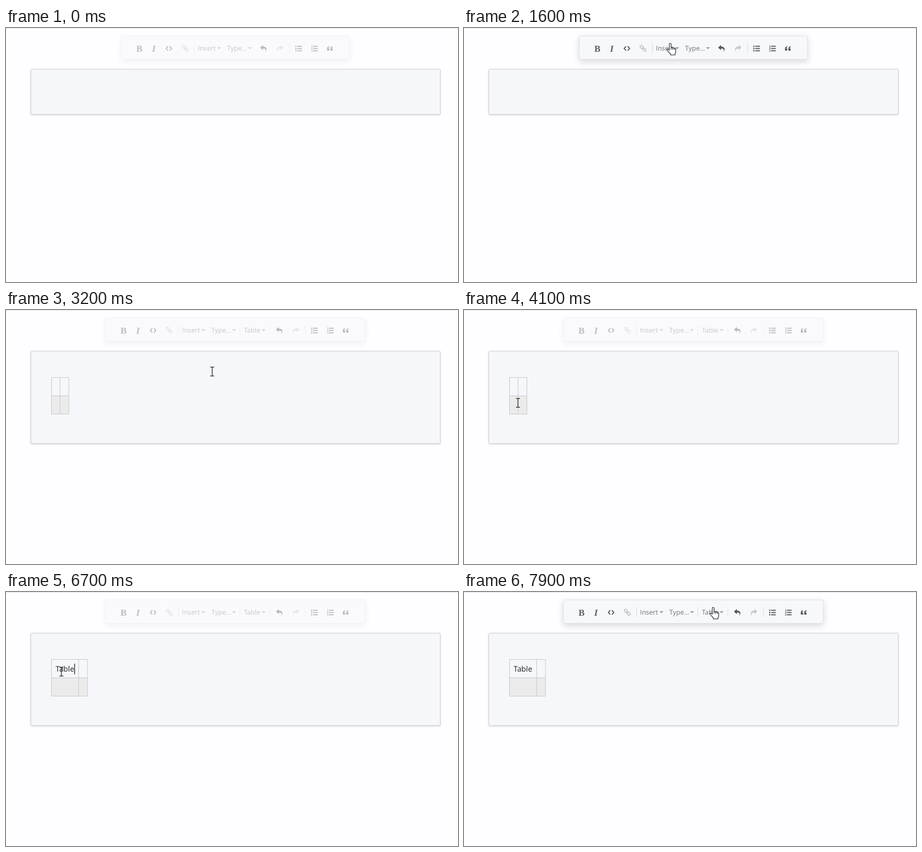
These frames come from a looping animation (800x450 px, 8 s). An HTML page:

```html
<!DOCTYPE html>
<html lang="en">
<head>
<meta charset="utf-8">
<title>Table editor</title>
<style>
  html, body { margin: 0; width: 100%; height: 100%; overflow: hidden; background: #fefdff; }
  svg { display: block; width: 100vw; height: 100vh; }
  text { font: 11.8px "Open Sans", "Noto Sans", sans-serif; fill: #747474; text-rendering: geometricPrecision; }
  .serif { font: bold 16px "Liberation Serif", serif; fill: #5c5c5c; }
  .num { font: bold 5px "Liberation Sans", sans-serif; fill: #555; }
  #word { font-size: 13.4px; fill: #222; }
  #editor { fill: #f5f7fa; stroke: #cfd1d4; filter: drop-shadow(0 1px 1.5px rgba(0,0,0,.16)); }
  #panel { fill: #f6f8fb; stroke: #dfe1e4; filter: drop-shadow(0 4px 6px rgba(0,0,0,.14)); }
  .icon { fill: #555; }
  .tri { fill: #a2a2a2; }
  .sep { stroke: #dcdcdc; }
  .off { opacity: .3; }
  .grid { fill: none; stroke: #cacaca; }
  .pointer { fill: #fff; stroke: #222; stroke-width: 1.1; stroke-linejoin: round; }
</style>
</head>
<body>
<svg viewBox="0 0 800 450">
  <path d="M0 .5H800" stroke="#e5e4e8"/>
  <rect id="editor" x="44" y="73" width="724.5" rx="1.5"/>

  <g id="table">
    <rect id="row" x="80.5" y="152" height="32" fill="#ebebeb"/>
    <path id="lines" class="grid"/>
    <text id="word" x="87.8" y="141.2"></text>
  </g>
  <rect id="caret" width="1.2" height="19" fill="#222"/>

  <g id="bar">
    <rect id="panel" y="14" height="41.5" rx="3"/>
    <g id="left">
      <text class="serif" x="230.8" y="41.6">B</text>
      <text class="serif" x="258.6" y="41.6" font-style="italic" style="font-style:italic">I</text>
      <path class="icon" transform="translate(282.3 29.3) scale(.0134)" d="M608 192l-96 96 224 224-224 224 96 96 288-320-288-320zM288 192l-288 320 288 320 96-96-224-224 224-224-96-96z"/>
      <g class="off" transform="translate(317 36) rotate(45)" fill="none" stroke="#555" stroke-width="1.6">
        <rect x="-6.6" y="-2.2" width="6" height="4.4" rx="2.2"/>
        <rect x=".6" y="-2.2" width="6" height="4.4" rx="2.2"/>
        <path d="M-2.2 0H2.2"/>
      </g>
      <path class="sep" d="M333.5 26.5V44.5"/>
      <text x="339.6" y="39.8">Insert</text>
      <path class="tri" d="M373.8 34h7.2l-3.6 3.7z"/>
      <text x="391.2" y="39.8">Type...</text>
      <path class="tri" d="M428 34h7.2l-3.6 3.7z"/>
    </g>
    <g id="middle">
      <path class="sep" d="M414 26.5V44.5M467 26.5V44.5"/>
      <text x="421" y="39.8">Table</text>
      <path class="tri" d="M452.4 34h7.2l-3.6 3.7z"/>
    </g>
    <g id="right">
      <path class="icon" transform="translate(449 30) scale(.0132 .0122)" d="M761 1024c113-206 132-520-313-509v253l-384-384 384-384v248c534-13 594 472 313 775z"/>
      <path class="icon off" transform="translate(478.4 30) scale(.0132 .0122)" d="M576 248v-248l384 384-384 384v-253c-446-10-427 303-313 509-280-303-221-789 313-775z"/>
      <path class="sep" d="M502 26.5V44.5"/>
      <path class="icon" d="M512 31.2h2.2v2.2h-2.2zM512 35.2h2.2v2.2h-2.2zM512 39.2h2.2v2.2h-2.2z"/>
      <path id="bars" class="icon" d="M515.6 31.4h8.2v1.8h-8.2zM515.6 35.4h8.2v1.8h-8.2zM515.6 39.4h8.2v1.8h-8.2z"/>
      <use href="#bars" x="28"/>
      <text class="num" x="540" y="34.2">1</text>
      <text class="num" x="540" y="38.2">2</text>
      <text class="num" x="540" y="42.2">3</text>
      <path class="icon" transform="translate(568.2 29.6) scale(.0156 .0148)" d="M0 448v256h256v-256h-128c0 0 0-128 128-128v-128c0 0-256 0-256 256zM640 320v-128c0 0-256 0-256 256v256h256v-256h-128c0 0 0-128 128-128z"/>
    </g>
  </g>

  <g id="menu">
    <rect x="340.5" y="44.5" width="98" height="73" fill="#fff" stroke="#b4b4b4"/>
    <rect id="hover" x="343" width="93" height="22.5" fill="#f2f2f2"/>
    <text x="346.4" y="63.6">Image</text>
    <text x="346.4" y="86.2">Horizontal rule</text>
    <text x="346.4" y="108.8">Table</text>
  </g>

  <g id="cursor">
    <path id="arrow" class="pointer" d="M.5.5V16.2L4.2 12.8 6.6 18.4 9 17.4 6.6 12H11.6z"/>
    <path id="beam" d="M-3.5-7.8H-1Q0-7.8 0-6.8Q0-7.8 1-7.8H3.5M0-7V7M-3.5 7.8H-1Q0 7.8 0 6.8Q0 7.8 1 7.8H3.5" fill="none" stroke="#222" stroke-width="1.2"/>
    <g id="hand" class="pointer" transform="translate(-6.6 -.6)">
      <path d="M5 2.4a1.6 1.6 0 0 1 3.2 0V8.8c.3-1.2 2.6-1 2.8.5.4-1.1 2.6-.9 2.8.6.5-.9 2.5-.6 2.5 1.2V16c0 1.5-1.2 2.5-1.2 4v1.4H7.2V20C6 18 3 15.5 1.2 12.8c-.8-1.4.8-2.6 2.2-1.3L5 13z"/>
      <path d="M8.2 8.8v3M11 9.3v2.8M13.8 9.9v2.4" fill="none"/>
    </g>
  </g>
</svg>
<script>
const LOOP = 8000, STEP = 100;
const el = id => document.getElementById(id);
const set = (id, attrs) => { for (const k in attrs) el(id).setAttribute(k, attrs[k]); };
const show = (id, on) => { el(id).style.display = on ? "" : "none"; };
const ramp = (t, a, b) => Math.min(1, Math.max(0, (t - a) / (b - a)));

// time, x, y of the pointer's hot spot
const path = [
  [300, 408, 247], [700, 311, 103], [1000, 311, 103], [1500, 365, 27],
  [1800, 365, 27], [2500, 365, 109], [3400, 365, 109], [4100, 95.5, 164.5],
  [4300, 95.5, 166], [4400, 102, 150], [4500, 95.5, 137], [4700, 95.5, 137],
  [4900, 95.5, 139], [6500, 95.5, 139], [6700, 98, 141], [6900, 96, 170],
  [7000, 96, 170], [7400, 402, 84], [7800, 441, 27], [LOOP, 441, 27]
];
// from, to, x, y of the blinking caret; x is null while it follows the text
const carets = [
  [900, 1400, 80, 104], [1900, 2400, 80, 104], [4300, 4500, 88, 159.5],
  [4500, 5100, 88, 127], [5600, 6900, null, 127], [7000, 7500, 88, 159.5]
];

function pointerAt(t) {
  const i = Math.max(1, path.findIndex(p => p[0] > t));
  const [a, b] = [path[i - 1], path[i]];
  const k = ramp(t, a[0], b[0]);
  return [a[1] + (b[1] - a[1]) * k, a[2] + (b[2] - a[2]) * k];
}

function draw(t) {
  const wide = t >= 3100, shift = wide ? 28 : 0;
  const menuOpen = t >= 1700 && t < 3100;
  const bottom = wide ? 236.5 : 153;

  set("editor", { height: bottom - 73 });
  set("panel", { x: 204 - shift, width: 404 + 2 * shift });
  set("left", { transform: `translate(${-shift})` });
  set("right", { transform: `translate(${shift})` });
  show("middle", wide);
  const active = ramp(t, 1300, 1500) - ramp(t, 3000, 3200) + ramp(t, 7600, 7800);
  el("bar").style.opacity = .4 + .6 * active;

  // Table columns grow with the typed word
  const typed = t < 5600 ? 0 : Math.floor((t - 5600) / 200) + 1;
  el("word").textContent = "Table".slice(0, typed);
  const textWidth = typed ? el("word").getComputedTextLength() : 0;
  const mid = 95.7 + textWidth, end = mid + 15.6;
  show("table", wide);
  set("row", { width: end - 80.5 });
  set("lines", { d: `M80.5 119.5H${end}V184.5H80.5ZM80.5 152H${end}M${mid} 119.5V184.5` });

  const caret = carets.find(c => t >= c[0] && t < c[1]);
  show("caret", caret);
  if (caret) set("caret", { x: caret[2] ?? 88 + textWidth, y: caret[3] });

  const [x, y] = pointerAt(t);
  show("menu", menuOpen);
  const item = Math.floor((y - 48) / 22.5);
  show("hover", menuOpen && item >= 0 && item < 3);
  set("hover", { y: 48 + 22.5 * Math.max(0, item) });

  const hand = menuOpen || (y > 14 && y < 56);
  const beam = !hand && y > 73 && y < bottom;
  show("cursor", t >= 300);
  set("cursor", { transform: `translate(${x} ${y})` });
  show("hand", hand);
  show("beam", beam);
  show("arrow", !hand && !beam);
}

function tick(now) {
  draw(Math.floor(now % LOOP / STEP) * STEP);
  requestAnimationFrame(tick);
}
draw(0);
requestAnimationFrame(tick);
</script>
</body>
</html>
```
